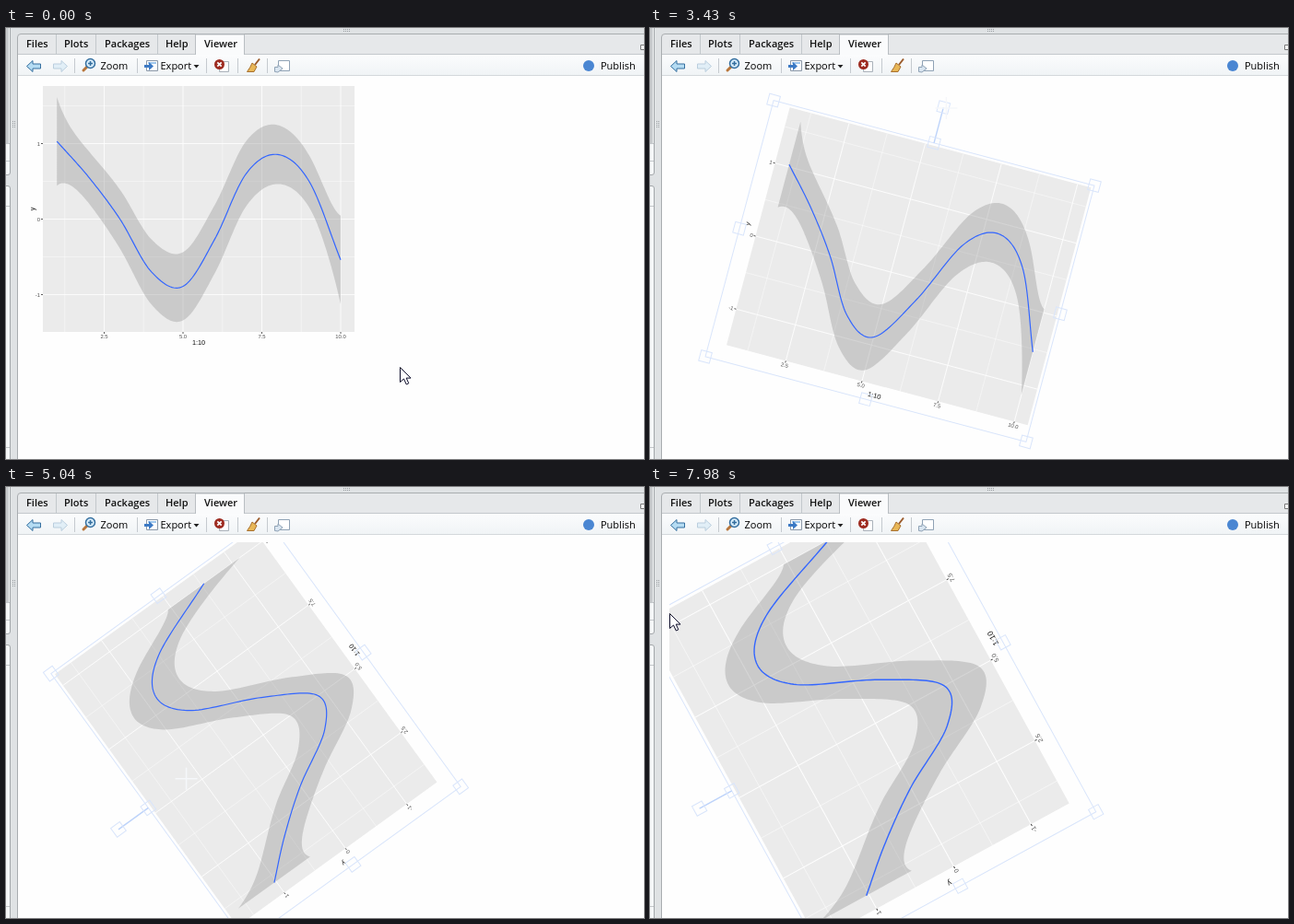
An HTML page for the animation above (8 s loop, 692 by 468 pixels).

```html
<!DOCTYPE html>
<html lang="en">
<head>
<meta charset="utf-8">
<title>Rotating and resizing a plot</title>
<style>
  html, body { margin: 0; width: 100%; height: 100%; overflow: hidden; background: #fff; }
  svg { display: block; }
  .ui { font: 11px "Open Sans", sans-serif; fill: #000; }
  .tabs { font-weight: 600; fill: #111; }
  .tick { font: 5.87px "Liberation Sans", sans-serif; fill: #4d4d4d; }
  .title { font: 7.3px "Liberation Sans", sans-serif; fill: #111; }
  #pointer path { fill: #fff; stroke: #0a0a28; }
  #pointer #cross { stroke: #f5f7fa; stroke-width: 1.5; }
  #selection { fill: none; stroke: #7fa9f8; }
  #selection .handle { stroke: #a9c4fa; }
  #selection.dragging, #selection.dragging .handle { stroke: #d9e5fb; }
  #selection.dragging #stem { stroke: #bdd3fa; stroke-width: 1.4; }
  #stem { stroke-width: 2; }
</style>
</head>
<body>
<svg id="stage" width="692" height="468" viewBox="0 0 692 468">
  <defs>
    <clipPath id="view"><path d="M21 60H692V468H21Z"/></clipPath>
    <linearGradient id="bar" x2="0" y2="1"><stop stop-color="#fbfcfd"/><stop offset="1" stop-color="#f0f4f6"/></linearGradient>
  </defs>

  <!-- window frame and neighbouring panes -->
  <path fill="#dfe2e4" d="M0 0H692V468H0Z"/>
  <path fill="#f5f7f8" stroke="#a3a7aa" d="M-1 -1H4.5V157Q4.500 159.500 2 159.500H-1ZM-1 171.500H2Q4.500 171.500 4.500 174V469H-1Z"/>
  <path fill="#c8cbcd" d="M0 0H3V125H0Z"/>
  <path stroke="#c3c7ca" d="M0 125.500H4M0 144.500H4M0 193.500H4M0 455.500H4"/>
  <path stroke="#9a9ea2" stroke-dasharray="1 1" d="M366 1.500H374M366 3.500H374M7.500 101V108M9.500 101V108"/>
  <path fill="#e6e8ea" stroke="#a9adb0" d="M12.500 469V10Q12.500 6.500 16 6.500H693V469Z"/>
  <path fill="#fefefe" d="M13 52H692V468H13Z"/>
  <path fill="url(#bar)" d="M13 29H692V51H13Z"/>
  <path stroke="#d3d8db" d="M13 51.500H692"/>
  <path stroke="#c3c8cc" d="M13 28.500H206M258 28.500H692M54.500 7V28M97.500 7V28M164.500 7V28"/>
  <path fill="#fafbfc" stroke="#b9bec2" d="M205.500 29V7H258.500V29"/>
  <path fill="#fff" stroke="#777" d="M693 18.500H688.500V23.500H693"/>
  <g class="ui tabs">
    <text x="22" y="21">Files</text><text x="63" y="21">Plots</text><text x="107" y="21">Packages</text>
    <text x="173" y="21">Help</text><text x="215" y="21">Viewer</text>
  </g>

  <!-- toolbar -->
  <path stroke="#c5cacf" d="M74.500 33V49M142.500 33V49M217.500 33V49M251.500 33V49M283.500 33V49"/>
  <g fill="#b5dcf3" stroke="#356f9f">
    <path d="M22.500 41.500L29 35.500V39H37.500V44H29V47.500Z"/>
    <path opacity=".3" d="M66.500 41.500L60 35.500V39H51.500V44H60V47.500Z"/>
  </g>
  <path stroke="#b8763b" stroke-width="3" stroke-linecap="round" d="M84 46L88 42"/>
  <circle cx="91.500" cy="38.500" r="5" fill="#d5ebfa" stroke="#356f9f" stroke-width="1.500"/>
  <path stroke="#356f9f" stroke-width="1.500" d="M89 38.500H94M91.500 36V41"/>
  <path fill="#fff" stroke="#8b98a8" d="M152.500 35.500H164.500V46.500H152.500Z"/>
  <path fill="#9ec6ec" d="M154 37H163V39H154Z"/>
  <path fill="#3b79c4" d="M150 40H155V37L160 41.500L155 46V43H150Z"/>
  <path fill="#222" d="M203.500 40H209.500L206.500 43.500Z"/>
  <path fill="#fff" stroke="#aab2ba" d="M231.500 36.500H241.500V47.500H231.500Z"/>
  <circle cx="231.500" cy="39.500" r="5.500" fill="#9d2b20"/>
  <path stroke="#fff" stroke-width="1.700" d="M229.300 37.300L233.700 41.700M233.700 37.300L229.300 41.700"/>
  <path stroke="#9b5b2b" stroke-width="2" d="M275 33.500L270 40"/>
  <path fill="#e8b757" stroke="#a8702e" d="M267 38L272 42L269 47.500H261.500Q265 43 267 38Z"/>
  <path fill="#fff" stroke="#8fa2b5" d="M295.500 35.500H307.500V46.500H295.500Z"/>
  <path fill="#d9e5f0" stroke="#8fa2b5" d="M291.500 47.500V42.500H295V40L300 44L295 48Z"/>
  <circle cx="632" cy="41" r="6" fill="#4a86d2"/>
  <g class="ui">
    <text x="102.500" y="45">Zoom</text><text x="167.500" y="45">Export</text><text x="645" y="45">Publish</text>
  </g>

  <g clip-path="url(#view)">
    <g id="plot">
      <path fill="#ebebeb" d="M40 63H378V330H40Z"/>
      <g id="axes"></g>
      <path id="band" fill="#999" fill-opacity=".4"/>
      <path id="curve" fill="none" stroke="#36f" stroke-width="1.200"/>
      <text class="title" x="209" y="344" text-anchor="middle">1:10</text>
      <text class="title" transform="translate(30.500 196.500) rotate(-90)" text-anchor="middle">y</text>
    </g>
    <g id="selection"></g>
  </g>

  <g id="pointer">
    <path id="arrow" d="M-.5-.5V15.500L3.500 12L6.300 18L8.800 16.800L6.200 11.100H11Z"/>
    <path id="move" d="M0-11L4-7H1.500V-1.500H7V-4L11 0L7 4V1.500H1.500V7H4L0 11L-4 7H-1.500V1.500H-7V4L-11 0L-7-4V-1.500H-1.500V-7H-4Z"/>
    <path id="resize" d="M-11.500 0L-6.500-5V-1.500H6.500V-5L11.500 0L6.500 5V1.500H-6.500V5Z"/>
    <path id="cross" d="M-12 0H12M0-12V12"/>
  </g>
</svg>
<script>
const $ = id => document.getElementById(id);
const ramp = (t, from, to) => Math.min(Math.max((t - from) / (to - from), 0), 1);
const ease = (t, from, to) => { const u = ramp(t, from, to); return u * u * (3 - 2 * u); };

// Smooth curve through [x, y] points, flat outside their range
function spline(points) {
  const last = points.length - 1;
  const slope = i => {
    const a = points[Math.max(i - 1, 0)], b = points[Math.min(i + 1, last)];
    return (b[1] - a[1]) / (b[0] - a[0]);
  };
  return x => {
    let i = 0;
    while (i < last - 1 && x > points[i + 1][0]) i++;
    const [x0, y0] = points[i], [x1, y1] = points[i + 1];
    const u = ramp(x, x0, x1), v = 1 - u;
    return y0 * v * v * (1 + 2 * u) + y1 * u * u * (3 - 2 * u)
      + (x1 - x0) * u * v * (v * slope(i) - u * slope(i + 1));
  };
}

// Plot: grid, tick labels, fitted curve with its band
const px = x => 21 + 34.2 * x, py = y => 207.5 - 82 * y;
const line = (d, width, color = '#fff') => `<path d="${d}" stroke="${color}" stroke-width="${width}"/>`;
const label = (x, y, anchor, text) => `<text class="tick" x="${x}" y="${y}" text-anchor="${anchor}">${text}</text>`;
let axes = '';
for (let i = 1; i <= 8; i++) {
  const x = px(i * 1.25), major = i % 2 === 0;
  axes += line(`M${x} 63V330`, major ? 0.8 : 0.4);
  if (major) axes += line(`M${x} 330v2`, 0.8, '#333') + label(x, 336.7, 'middle', (i * 1.25).toFixed(1));
}
for (let i = -2; i <= 3; i++) {
  const y = py(i / 2), major = i % 2 === 0;
  axes += line(`M40 ${y}H378`, major ? 0.8 : 0.4);
  if (major) axes += line(`M40 ${y}h-2`, 0.8, '#333') + label(37, y + 2.1, 'end', i / 2);
}
$('axes').innerHTML = axes;

const fit = spline([1.03, 0.56, 0, -0.7, -0.89, -0.27, 0.6, 0.855, 0.5, -0.54].map((y, i) => [i + 1, y]));
const halfBand = x => {
  const d = x - 5.5;
  return (37.3 - 0.85 * d * d + 28 * (d / 4.5) ** 12) / 82;
};
const xs = Array.from({ length: 181 }, (_, i) => 1 + i / 20);
const trace = side => xs.map(x => `${px(x).toFixed(2)} ${py(fit(x) + side * halfBand(x)).toFixed(2)}`);
$('curve').setAttribute('d', 'M' + trace(0).join('L'));
$('band').setAttribute('d', 'M' + [...trace(1), ...trace(-1).reverse()].join('L') + 'Z');

// Motion
const rotation = spline([[3150, 0], [3430, 14.9], [4130, 93.4], [5040, 234.1], [5180, 241.3]]);
const rotating = t => t > 3150 && t <= 5250;
const glides = [ // start, end, target x, y
  [140, 840, 187, 171], [980, 1820, 257, 231], [1890, 2100, 271, 177], [2100, 2590, 266, 77],
  [3150, 5250, 190, 308], [5250, 6020, 57, 176], [6860, 7840, 0, 140], [7840, 7980, 22, 138]
];

function pointerAt(t, angle) {
  if (rotating(t)) {
    const a = (angle + 1) * Math.PI / 180, r = 184 - 92 * ramp(t, 3430, 5040);
    return [271 + r * Math.sin(a), 264 - r * Math.cos(a)];
  }
  return glides.reduce(([x, y], [from, to, tx, ty]) => {
    const u = ease(t, from, to);
    return [x + (tx - x) * u, y + (ty - y) * u];
  }, [428, 369]);
}

function cursorAt(t) {
  if (t >= 1890 && t < 2400 || t >= 5320 && t < 5900) return 'move';
  if (t >= 2940 && t < 5320) return 'cross';
  return t >= 6440 && t < 6930 ? 'resize' : 'arrow';
}

function selectionMarks(w, h) {
  const handle = (x, y) => `<path class="handle" d="M${x - 6} ${y - 6}h12v12h-12Z"/>`;
  let marks = `<path d="M${-w} ${-h}H${w}V${h}H${-w}Z"/><path id="stem" d="M0 ${-h}v-40"/>` + handle(0, -h - 40);
  for (const i of [-1, 0, 1]) for (const j of [-1, 0, 1]) if (i || j) marks += handle(i * w, j * h);
  return marks;
}

function draw(t) {
  const angle = rotation(t), left = 1 - ease(t, 980, 1820);
  const growth = 0.165 * Math.sin(ramp(t, 6860, 7980) * Math.PI / 2);
  // Resizing keeps the corner opposite the dragged one in place
  const cx = 271 - 70 * left - 213 * growth, cy = 264 - 60 * left - 88.7 * growth;
  const pose = `translate(${cx} ${cy}) rotate(${angle})`;
  $('plot').setAttribute('transform', `${pose} scale(${1 + growth}) translate(-201 -204)`);

  const selection = $('selection');
  selection.style.display = t < 1750 ? 'none' : '';
  selection.setAttribute('transform', pose);
  selection.setAttribute('class', t < 1960 || rotating(t) || t >= 6930 ? 'dragging' : '');
  selection.innerHTML = selectionMarks(180 * (1 + growth), 144 * (1 + growth));

  $('pointer').setAttribute('transform', `translate(${pointerAt(t, angle).join(' ')})`);
  const shown = cursorAt(t);
  for (const shape of $('pointer').children) shape.style.display = shape.id === shown ? '' : 'none';
}

// The screen refreshes in 70 ms steps
function tick(now) {
  draw(Math.floor(now % 8000 / 70) * 70);
  requestAnimationFrame(tick);
}
tick(performance.now());
</script>
</body>
</html>
```
